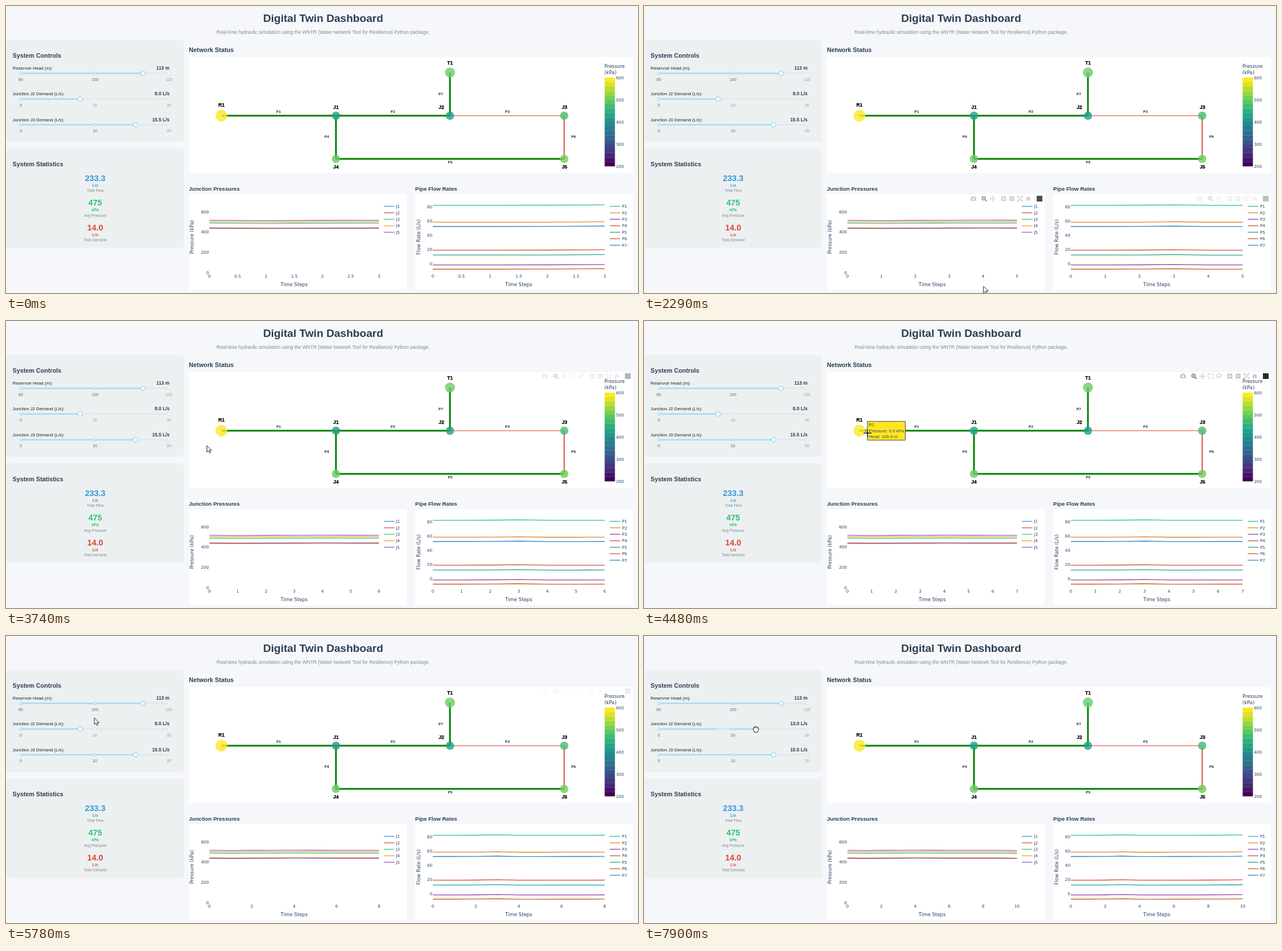
Write an HTML page that moves like this. It is 1109 by 505 pixels and loops after 8000 ms.

```html
<!DOCTYPE html>
<html lang="en">
<head>
<meta charset="utf-8">
<title>Digital Twin Dashboard</title>
<style>
  html, body { margin: 0; width: 100%; height: 100%; overflow: hidden; background: #f5f7fa; }
  svg { display: block; width: 1109px; height: 505px; font-family: "Liberation Sans", Arial, sans-serif; }
  .plot { font-family: "DejaVu Sans", Verdana, sans-serif; fill: #2a3f5f; }
  .b { font-weight: 700; }
</style>
</head>
<body>
<svg id="stage" viewBox="0 0 1109 505" xmlns="http://www.w3.org/2000/svg"></svg>
<script>
const LOOP = 8000;
const stage = document.getElementById('stage');

const rect = (x, y, w, h, fill, more = '') =>
  `<rect x="${x}" y="${y}" width="${w}" height="${h}" fill="${fill}" ${more}/>`;
const circle = (x, y, r, fill, more = '') =>
  `<circle cx="${x}" cy="${y}" r="${r}" fill="${fill}" ${more}/>`;
const line = (x1, y1, x2, y2, color, w) =>
  `<line x1="${x1}" y1="${y1}" x2="${x2}" y2="${y2}" stroke="${color}" stroke-width="${w}"/>`;
const text = (x, y, size, str, fill, anchor = 'start', more = '') =>
  `<text x="${x}" y="${y}" font-size="${size}" text-anchor="${anchor}" ${fill ? `fill="${fill}"` : ''} ${more}>${str}</text>`;
const BOLD = 'class="b"';
const PLOT = 'class="plot"';

/* header, panels, statistics */
const INK = '#2c3e50';
function page() {
  let s = rect(0, 0, 1109, 505, '#f5f7fa');
  s += text(556.5, 28.3, 19.1, 'Digital Twin Dashboard', INK, 'middle', BOLD);
  s += text(556.5, 49.3, 8.4, 'Real-time hydraulic simulation using the WNTR (Water Network Tool for Resilience) Python package.', '#7f8c8d', 'middle');
  s += rect(0.5, 60, 311.5, 179, '#ecf0f1', 'rx="6"') + rect(0.5, 251, 311.5, 175, '#ecf0f1', 'rx="6"');
  s += rect(321, 90, 779, 204, '#fff') + rect(321, 331, 382, 169, '#fff') + rect(718, 331, 382, 169, '#fff');
  const heads = [[11.5, 91.4, 10.75, 'System Controls'], [11.5, 282.4, 10.75, 'System Statistics'],
    [321, 80.5, 10.8, 'Network Status'], [321, 324.5, 9.6, 'Junction Pressures'], [718, 324.5, 9.6, 'Pipe Flow Rates']];
  for (const [x, y, size, str] of heads) s += text(x, y, size, str, INK, 'start', BOLD);
  const stats = [['233.3', 'L/s', 'Total Flow', '#3498db'], ['475', 'kPa', 'Avg Pressure', '#2ec46f'], ['14.0', 'L/s', 'Total Demand', '#dc4632']];
  stats.forEach(([value, unit, name, color], i) => {
    const y = 307.6 + 43.5 * i;
    s += text(156.5, y, 14.3, value, color, 'middle', BOLD);
    s += text(156.5, y + 10, 7.1, unit, color, 'middle', BOLD);
    s += text(156.5, y + 19.7, 6.55, name, '#7f8c8d', 'middle');
  });
  return s;
}

/* sliders */
const sliderText = [
  ['Reservoir Head (m):', [80, 100, 120], 118.5],
  ['Junction J2 Demand (L/s):', [0, 10, 20], 163.7],
  ['Junction J3 Demand (L/s):', [0, 10, 20], 209]];
function slider(i, hx, value, pale) {
  const [name, marks, y] = sliderText[i];
  let s = text(11.5, y - 6.5, 7.8, name, '#222') + text(287, y - 6.5, 8.35, value, INK, 'end', BOLD);
  s += rect(26, y - 1.3, 260, 2.6, '#e4e6e8', 'rx="1.3"') + rect(26, y - 1.3, hx - 26, 2.6, '#a4defa', 'rx="1.3"');
  if (pale) s += rect(129, y - 1.4, Math.min(hx, 150) - 129, 2.8, '#d3e9f3');
  marks.forEach((m, k) => {
    const x = 26 + 130 * k, on = x <= hx;
    s += circle(x, y, 2, '#fff', `stroke="${on ? '#96dbfa' : '#e2e4e6'}" stroke-width="1.2"`);
    s += text(x, y + 13, 7.2, m, on ? '#666' : '#999', 'middle');
  });
  return s + circle(hx, y, 3.8, '#fff', 'stroke="#8fd6f8" stroke-width="1.3"');
}

/* network */
const nodes = {
  R1: [378, 193, 10.4, '#fde725', 378, 177.2], T1: [779, 117, 8.8, '#6ccd66', 779, 103.2],
  J1: [579, 193, 7.3, '#1fa088', 579, 181.2], J2: [779, 193, 7.3, '#1fa088', 764, 181.2],
  J3: [979.5, 193, 7.3, '#42be71', 980, 181.2], J4: [579, 269, 7.3, '#65cb5e', 579, 285.6],
  J5: [979.5, 269, 7.3, '#6ece58', 980, 285.6]};
const pipes = [
  ['P1', 'R1', 'J1', '#008000', 3.2, 478.5, 188.3], ['P2', 'J1', 'J2', '#008000', 3.2, 679, 188.3],
  ['P3', 'J2', 'J3', '#f29a94', 1.8, 880, 188.3], ['P4', 'J1', 'J4', '#008000', 3, 563, 232.3],
  ['P5', 'J4', 'J5', '#008000', 3, 779.5, 277], ['P6', 'J3', 'J5', '#dc382e', 1.8, 996, 232.3],
  ['P7', 'J2', 'T1', '#008000', 3, 763, 156.7]];
const viridis = ['#440154', '#482878', '#3e4989', '#31688e', '#26828e', '#1f9e89', '#35b779', '#6ece58', '#b5de2b', '#fde725'];
function ramp(u) {
  const p = u * (viridis.length - 1), i = Math.min(Math.floor(p), viridis.length - 2);
  const part = (c, k) => parseInt(c.slice(1 + 2 * k, 3 + 2 * k), 16);
  return `rgb(${[0, 1, 2].map(k => Math.round(part(viridis[i], k) + (part(viridis[i + 1], k) - part(viridis[i], k)) * (p - i)))})`;
}
function network() {
  let s = '';
  for (const [, a, b, color, w] of pipes) s += line(nodes[a][0], nodes[a][1], nodes[b][0], nodes[b][1], color, w);
  for (const n in nodes) {
    const [x, y, r, color, tx, ty] = nodes[n];
    s += circle(x, y, r, color, 'opacity=".8"');
    s += text(tx, ty, 8.7, n, '#000', 'middle', BOLD + ' stroke="#000" stroke-width=".25"');
  }
  for (const [n, , , , , x, y] of pipes)
    s += text(x, y, 5.9, n, '', 'middle', 'class="plot b"');
  s += text(1050, 109.2, 8.4, 'Pressure', '', 'start', PLOT) + text(1050, 120, 8.4, '(kPa)', '', 'start', PLOT);
  for (let i = 0; i < 20; i++) s += rect(1050.5, 274.2 - 7.8 * i, 18, 8, ramp(i / 19));
  for (let v = 200; v <= 600; v += 100) s += text(1070.5, 284.7 - (v - 200) * 0.39, 7.2, v, '', 'start', PLOT);
  return s;
}

/* line charts: name, base y, colour */
const pressure = {
  x0: 357, x1: 654.5, title: 'Pressure (kPa)', tx: 329.3, legend: 663, ticks: [0, 200, 400, 600], y0: 469, k: 0.179,
  dev: [0, 0.5, 0.15, 0, -0.15, -0.1, 0, 0, 0, 0, 0.55],
  rows: [['J1', 391.1, '#3498db'], ['J2', 390.5, '#dc4f3e'], ['J3', 382.2, '#3fc978'], ['J4', 379.7, '#f0a02a'], ['J5', 377.1, '#9b59b6']]};
const flow = {
  x0: 749, x1: 1050.5, title: 'Flow Rate (L/s)', tx: 726.5, legend: 1059.5, ticks: [0, 20, 40, 60, 80], y0: 453, k: 1.25,
  dev: [0, -0.02, -0.1, -0.75, 0.12, 0.1, 0, 0, -0.1, -0.2, -0.7],
  rows: [['P1', 350.6, '#2cbfa4'], ['P2', 380.4, '#e6822c'], ['P3', 455.6, '#8e44ad'], ['P4', 429.6, '#d2503a'],
    ['P5', 438.2, '#1fa68b'], ['P6', 463, '#d55f14'], ['P7', 388, '#3187c4']]};

function chart(c, max) {
  const px = v => c.x0 + (c.x1 - c.x0) * v / max;
  let s = '';
  c.rows.forEach(([name, y, color], i) => {
    const pts = c.dev.slice(0, max + 1).map((d, v) => `${px(v).toFixed(1)},${(y + d).toFixed(2)}`).join(' ');
    s += `<polyline points="${pts}" fill="none" stroke="${color}" stroke-width="1.3"/>`;
    const ly = 352.5 + 11.4 * i;
    s += line(c.legend, ly, c.legend + 18.5, ly, color, 1.3) + text(c.legend + 21.5, ly + 2.6, 7.2, name, '', 'start', PLOT);
  });
  for (const v of c.ticks) s += text(c.x0 - 1, c.y0 + 2.9 - c.k * v, 7.2, v, '', 'end', PLOT);
  const step = [0.5, 1, 2].find(d => d >= max / 7.5);
  for (let v = 0; v <= max; v += step) s += text(px(v), 477.5, 7.2, v, '', 'middle', PLOT);
  s += text((c.x0 + c.x1) / 2, 493.3, 8.5, 'Time Steps', '', 'middle', PLOT);
  return s + text(0, 0, 8.4, c.title, '', 'middle', `${PLOT} transform="translate(${c.tx} 406.5) rotate(-90)"`);
}

/* toolbars */
const stroke = (d, w = 1.3) => `<path d="${d}" fill="none" stroke="#444" stroke-width="${w}"/>`;
const icons = {
  camera: '<path d="M-5-2.8h2.4l1-1.6h3.2l1 1.6H5V3.8H-5z" fill="#444"/>' + circle(0, 0.4, 1.8, '#fff'),
  zoom: '<circle cx="-.7" cy="-.7" r="3.1" fill="none" stroke="#444" stroke-width="1.5"/>' + stroke('M1.6 1.6L4.6 4.6', 1.9) + stroke('M-2.2-.7h3M-.7-2.2v3', 0.9),
  pan: stroke('M-4.6 0h9.2M0-4.6v9.2M-3.2-1.5L-4.7 0l1.5 1.5M3.2-1.5L4.7 0 3.2 1.5M-1.5-3.2L0-4.7l1.5 1.5M-1.5 3.2L0 4.7l1.5-1.5', 1),
  box: '<rect x="-4" y="-4" width="8" height="8" fill="none" stroke="#444" stroke-width="1.2" stroke-dasharray="2 1"/>',
  lasso: stroke('M-2 1.5C-8-3 3-6 4.5-2 5 1-1 3-2.5 1.5c-1.5 1 0 2 .5 3', 1.2),
  plus: '<path d="M-4.2-4.2h8.4v8.4h-8.4z" fill="#444"/>' + '<path d="M-2.5 0h5M0-2.5v5" stroke="#fff" stroke-width="1.3"/>',
  minus: '<path d="M-4.2-4.2h8.4v8.4h-8.4z" fill="#444"/>' + '<path d="M-2.5 0h5" stroke="#fff" stroke-width="1.3"/>',
  fit: stroke('M-4.4-2v-2.4h2.4M2-4.4h2.4V-2M4.4 2v2.4H2M-2 4.4h-2.4V2M-3.5-3.5l7 7M3.5-3.5l-7 7', 1.2),
  home: '<path d="M-5 .4L0-4.3 5 .4H3.6V4H1V1.2H-1V4H-3.6V.4z" fill="#444"/>'};
function toolbar(id, right, y, list) {
  let s = rect(right - 5, y - 5, 10, 10, '#2a2a2a');
  for (const [name, dx] of list)
    s += `<g transform="translate(${right + dx} ${y})" opacity="${name === 'zoom' ? 0.7 : 0.3}">${icons[name]}</g>`;
  return `<g id="${id}" opacity="0">${s}</g>`;
}
const tail = [['plus', -63], ['minus', -48.5], ['fit', -34], ['home', -19.5]];
const small = [['camera', -116], ['zoom', -97], ['pan', -82], ...tail];
const large = [['camera', -145], ['zoom', -126], ['pan', -111], ['box', -97], ['lasso', -82], ...tail];

/* hover labels */
function tip(id, x, y, rows, fill, ink) {
  let s = `<path d="M${x} ${y - 16}h66.5v33h-66.5v-13l-4-4 4-4z" fill="${fill}" stroke="${ink}" stroke-width="1"/>`;
  rows.forEach((r, i) => s += text(x + 2.2, y - 7.3 + 10.2 * i, 7.8, r, ink));
  return `<g id="${id}" visibility="hidden">${s}</g>`;
}

const pointers = `
  <circle id="press" r="8.5" fill="#f4ee3c" opacity=".7" visibility="hidden"/>
  <g id="arrow"><path d="M0 0V11.6L2.7 9.2 4.5 13.2 6.5 12.3 4.7 8.4H8.3z" fill="#fff" stroke="#111" stroke-width=".9"/></g>
  <g id="cross"><path d="M-7 0H7M0-7V7" stroke="#fff" stroke-width="2.6" opacity=".6"/><path d="M-7 0H7M0-7V7" stroke="#101010" stroke-width="1.4"/></g>
  <g id="hand"><path d="M-4.6-.5C-4.8-2-3.4-2.2-3-1.5V-3.4C-3-4.6-1.4-4.6-1.2-3.6-1-4.9.8-4.9 1-3.6 1.4-4.6 2.9-4.3 2.9-3.1 3.6-3.8 4.8-3.2 4.8-2V1C4.8 3 3.6 3.6 3.2 5.2H-2.4C-2.6 3.4-4.4 2.4-4.6-.5z" fill="#fff" stroke="#111" stroke-width="1"/><path d="M-1.2-3.4v1.8M1-3.4v1.8M2.9-3v1.6" stroke="#111" stroke-width=".7"/></g>`;

stage.innerHTML = page() + slider(0, 240.5, '113 m') + '<g id="demand"></g>' + slider(2, 227.5, '15.5 L/s') +
  network() + '<g id="charts"></g>' +
  toolbar('barP', 694, 339, small) + toolbar('barF', 1091, 339, small) + toolbar('barN', 1091, 97, large) +
  tip('tipR', 392, 192.7, ['R1', 'Pressure: 0.0 kPa', 'Head: 100.0 m'], '#fde725', '#444') +
  tip('tipJ', 590, 192.7, ['J1', 'Pressure: 437 kPa', 'Head: 99.6 m'], '#1fa088', '#fff') + pointers;
const el = id => document.getElementById(id);

/* timelines: [time, ...values] */
const path = [[0, 1116, 510], [990, 1116, 510], [1060, 1108, 497], [1200, 1106, 492], [1800, 1106, 492], [1940, 985, 492], [2110, 730, 495],
  [2290, 596, 493], [2450, 555, 488], [2640, 536, 484], [2710, 535, 484], [2990, 535, 484], [3180, 440, 450], [3390, 307, 391],
  [3510, 281, 325], [3660, 326, 245], [3810, 375, 197], [4440, 375, 197], [4700, 485, 198], [4970, 579, 198], [5440, 579, 198],
  [5600, 370, 172], [5780, 155, 144], [6260, 139, 158], [6500, 130, 162], [6810, 131, 164], [6900, 131, 164], [7080, 160, 167],
  [7350, 180, 165], [7630, 193, 164], [7850, 193, 164], [7900, 196, 164]];
const grip = [[0, 130], [6920, 130], [7080, 156], [7350, 178], [7630, 193], [7850, 193], [7900, 196]];
const fades = {
  barP: [[2130, 0], [2320, 1], [3400, 1], [3640, 0]],
  barF: [[1830, 0], [1990, 1], [2130, 1], [2360, 0]],
  barN: [[3640, 0], [3930, 1], [5560, 1], [5800, 0]]};
const updates = [390, 1400, 3440, 4480, 5500, 6520, 7540];

function at(keys, t) {
  let i = keys.findIndex(k => k[0] > t);
  if (i === 0) return keys[0].slice(1);
  if (i < 0) return keys[keys.length - 1].slice(1);
  const a = keys[i - 1], b = keys[i], u = (t - a[0]) / (b[0] - a[0]);
  return a.slice(1).map((v, k) => v + (b[k + 1] - v) * u);
}
const inside = (x, y, l, t, r, b) => x > l && x < r && y > t && y < b;
const show = (id, on) => el(id).setAttribute('visibility', on ? 'visible' : 'hidden');

let shown = -1;
function draw(t) {
  const max = 3 + updates.filter(u => t >= u).length;
  if (max !== shown) el('charts').innerHTML = chart(pressure, max) + chart(flow, max);
  shown = max;

  const [x, y] = at(path, t);
  const [hx] = at(grip, t);
  el('demand').innerHTML = slider(1, hx, t < 7900 ? '8.0 L/s' : '13.0 L/s', t >= 6950 && hx > 130);
  for (const id in fades) el(id).setAttribute('opacity', at(fades[id], t)[0]);

  const near = n => Math.hypot(x - nodes[n][0], y - nodes[n][1]) < 18;
  show('tipR', near('R1'));
  show('tipJ', near('J1'));

  const cross = inside(x, y, 357, 102, 1042, 282) || inside(x, y, 357, 349, 654, 469);
  const kind = t >= 7200 ? 'hand' : cross ? 'cross' : 'arrow';
  for (const id of ['arrow', 'cross', 'hand']) {
    show(id, id === kind);
    el(id).setAttribute('transform', `translate(${x.toFixed(1)} ${y.toFixed(1)})`);
  }
  show('press', t >= 6950 && t < 7250);
  el('press').setAttribute('cx', x);
  el('press').setAttribute('cy', y);
}

const start = performance.now();
function tick() {
  draw((performance.now() - start) % LOOP);
  requestAnimationFrame(tick);
}
tick();
</script>
</body>
</html>
```
